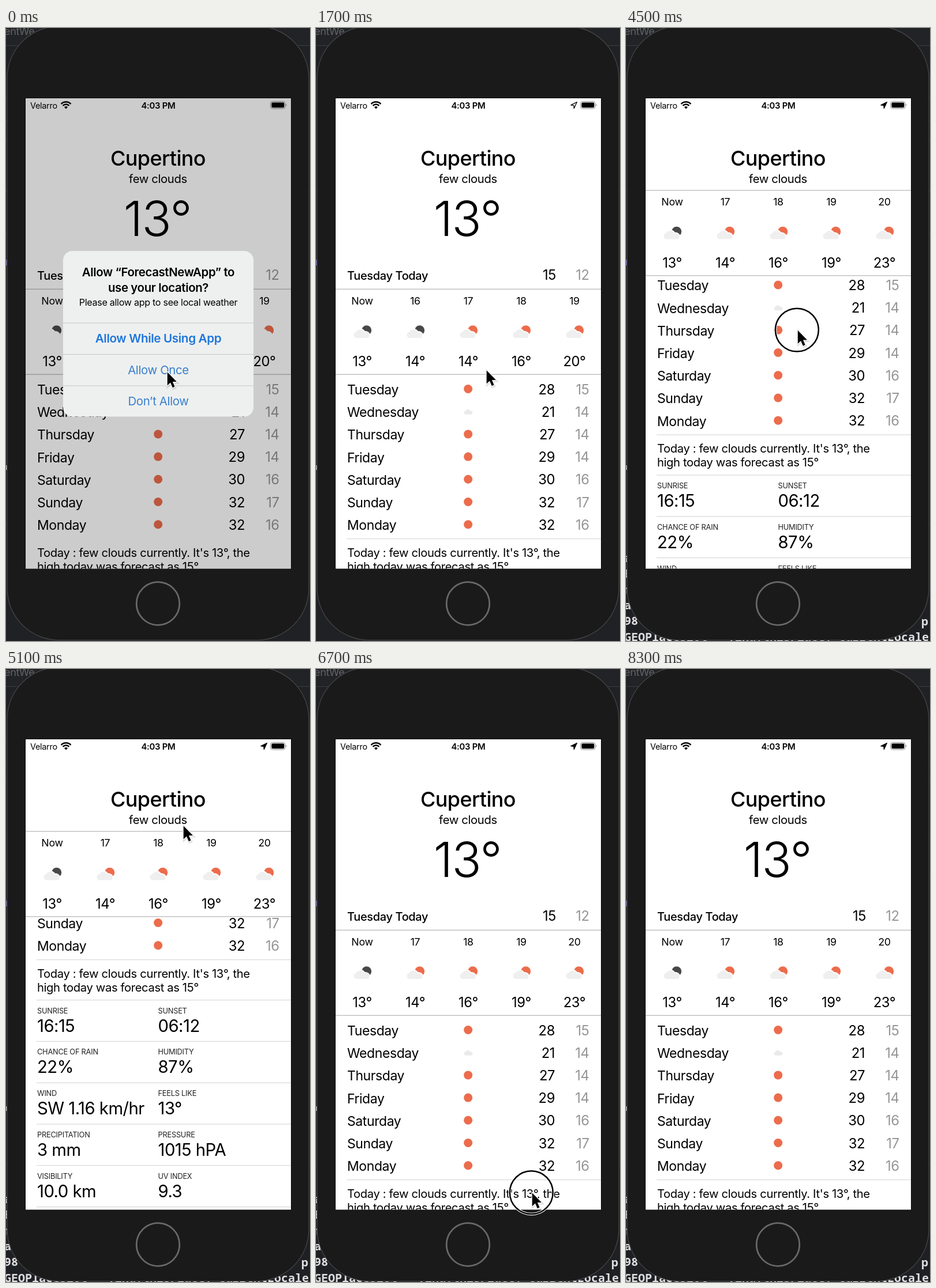
Write an HTML page that moves like this. It is 527 px wide and 1064 px high and loops after 8.4 s.

```html
<!DOCTYPE html>
<html lang="en">
<head>
<meta charset="utf-8">
<title>Weather</title>
<style>
html, body { margin: 0; width: 100%; height: 100%; overflow: hidden; background: #202125; }
svg { display: block; width: 527px; height: 1064px; }
text { font-family: Inter, Roboto, sans-serif; letter-spacing: -0.018em; white-space: pre; }
.mono { font: 700 20px "Noto Sans Mono", "DejaVu Sans Mono", monospace; letter-spacing: 0; fill: #dededf; }
</style>
</head>
<body>
<svg id="stage" viewBox="0 0 527 1064"></svg>
<script>
const LOOP = 8400, STEP = 100, MAX_SCROLL = 382, COLLAPSE = 171.5;
const SUN = '#ec6c4c', NIGHT = '#48484a', CLOUD = '#efefef', GREY = '#969696';

const rect = (x, y, w, h, fill, extra = '') =>
  `<rect x="${x}" y="${y}" width="${w}" height="${h}" fill="${fill}" ${extra}/>`;
const circle = (x, y, r, fill, extra = '') =>
  `<circle cx="${x}" cy="${y}" r="${r}" fill="${fill}" ${extra}/>`;
const text = (x, y, size, str, { anchor = 'start', weight = 400, fill = '#000' } = {}) =>
  `<text x="${x}" y="${y}" font-size="${size}" text-anchor="${anchor}" font-weight="${weight}" fill="${fill}">${str}</text>`;
const mid = { anchor: 'middle' }, end = { anchor: 'end' };
const pale = { anchor: 'end', fill: GREY };

// Desktop behind the phone
function desktop() {
  const edges = [120, 160, 195, 283, 355, 860].map(y => rect(0, y, 527, 1, '#37383b')).join('');
  const rows = ['a', 'B', 'm', 'a', '98', 'GEOPlaceSlot = find(thisPlace, currentLocale'];
  const log = rows.map((r, i) => `<text class="mono" x="-3" y="${927 + i * 27.3}">${r}</text>`).join('');
  return rect(0, 0, 527, 1064, '#202125') + rect(0, 0, 527, 30, '#222327') +
    rect(0, 30, 527, 1, '#3c3d41') + edges +
    text(-3, 12, 18, 'entWe', { fill: '#636467' }) +
    rect(0, 402, 1.5, 10, '#7d6bb5') + rect(0, 759, 1.5, 8, '#c9c9c9') +
    `<g id="log">${rect(0, 861, 527, 203, '#1f2024')}${log}<text class="mono" x="512" y="1037">p</text></g>`;
}

function phone() {
  return rect(2, -3, 523, 1065.5, '#1a1a1a', 'rx="90" stroke="#48484a" stroke-width="1.2"') +
    circle(263.5, 999, 37.3, 'none', 'stroke="#696969" stroke-width="2.8"') +
    rect(34, 122, 460, 816.5, '#fff', 'stroke="#0c0c0c" stroke-width="2" paint-order="stroke"');
}

function cloudIcon(x, color) {
  const shape = 'M-10 13A5.4 5.4 0 0 1 -10.2 2.4A8 8 0 0 1 4 3.4A5.9 5.9 0 0 1 10.5 13Z';
  return `<g transform="translate(${x} 525)">${circle(7.7, -0.2, 8.5, color)}
    <path d="${shape}" fill="#fff" stroke="#fff" stroke-width="3.6"/>
    <path class="faint" d="${shape}" fill="${CLOUD}"/></g>`;
}

function hours(id, names, temps, nights) {
  const cols = names.map((n, i) => {
    const x = 80 + 92 * i;
    return text(x, 479.5, 17.8, n, mid) + cloudIcon(x, i < nights ? NIGHT : SUN) +
      text(x, 587, 23.8, temps[i] + '°', mid);
  });
  return `<g id="${id}">${cols.join('')}</g>`;
}

function days() {
  const list = [['Tuesday', 28, 15], ['Wednesday', 21, 14], ['Thursday', 27, 14], ['Friday', 29, 14],
    ['Saturday', 30, 16], ['Sunday', 32, 17], ['Monday', 32, 16]];
  return list.map(([name, hi, lo], i) => {
    const y = 627 + 39.2 * i;
    const icon = i === 1
      ? `<path class="faint" d="M259 ${y + 4.5}a3.2 3.2 0 0 1 0-6.2a4.5 4.5 0 0 1 8.2 0a3.2 3.2 0 0 1 2 6.2z" fill="#eaeaea"/>`
      : circle(263.7, y - 0.5, 7.5, SUN);
    return text(54, y + 9, 23, name) + icon + text(414, y + 8.5, 23.8, hi, end) +
      text(473.5, y + 8.5, 23.8, lo, pale);
  }).join('');
}

const divider = y => rect(53, y, 441, 1.2, '#d9d9d9', 'class="faint"');

function details() {
  const rows = [['SUNRISE', '16:15', 'SUNSET', '06:12'], ['CHANCE OF RAIN', '22%', 'HUMIDITY', '87%'],
    ['WIND', 'SW 1.16 km/hr', 'FEELS LIKE', '13°'], ['PRECIPITATION', '3 mm', 'PRESSURE', '1015 hPA'],
    ['VISIBILITY', '10.0 km', 'UV INDEX', '9.3']];
  const cells = rows.map((r, i) => {
    const y = 956 + 71.8 * i;
    return divider(y) + [0, 2].map(k => {
      const x = k ? 263.5 : 54;
      return text(x, y + 23.5, 12.8, r[k], { fill: '#222' }) + text(x, y + 55.5, 29.3, r[k + 1]);
    }).join('');
  });
  return divider(886) + text(54, 917.5, 20.2, "Today : few clouds currently. It's 13°, the") +
    text(54, 942, 20.2, 'high today was forecast as 15°') + cells.join('') + divider(956 + 71.8 * 5);
}

function statusBar() {
  const arc = r => `<path d="M${104 - r * .74} ${140 - r * .7}A${r} ${r} 0 0 1 ${104 + r * .74} ${140 - r * .7}" fill="none" stroke="#000" stroke-width="2.5"/>`;
  return text(42, 139.5, 14.4, 'Velarro') + arc(11.4) + arc(7.3) +
    '<path d="M104 140.5L101 137.3Q104 134.8 107 137.3Z"/>' +
    text(264, 139.5, 14.9, '4:03 PM', { anchor: 'middle', weight: 600 }) +
    '<path id="arrow" d="M452.3 128.5L441.8 133.8L446.8 134.3L447.3 139.6Z" stroke="#000" stroke-width="1.3" stroke-linejoin="round"/>' +
    rect(458.5, 127.5, 25.5, 12.5, 'none', 'rx="3.8" stroke="#8c8c8c" stroke-width="1"') +
    rect(460.3, 129.3, 22, 9, '#000', 'rx="2.2"') +
    '<path d="M485.3 131.6q2.4 2.1 0 4.2z" fill="#8c8c8c"/>';
}

function alertBox() {
  const line = y => rect(99, y, 330, 1, '#c5c7c7');
  const bold = { anchor: 'middle', weight: 600 };
  const blue = { anchor: 'middle', fill: '#3a7fcd' };
  return rect(99, 387, 330, 287.5, '#eef0ef', 'rx="16"') +
    `<g id="pressed">${rect(99, 566, 330, 54, '#dcdedd')}</g>` +
    text(264, 430.5, 20.4, 'Allow “ForecastNewApp” to', bold) +
    text(264, 457.5, 20.4, 'use your location?', bold) +
    text(264, 482, 16.1, 'Please allow app to see local weather', mid) +
    line(511.5) + line(566) + line(620.5) +
    text(264, 546, 20.7, 'Allow While Using App', { ...bold, fill: '#1f76dc' }) +
    text(264, 600.5, 20.4, 'Allow Once', blue) + text(264, 655, 20.4, 'Don’t Allow', blue);
}

function pointer() {
  const d = 'M0.7 1.2V24.5L6 19.5L9.8 28.2L13.6 26.6L9.9 18.1H17Z';
  const ring = (color, width) => circle(-0.7, 0.7, 37.4, 'none', `stroke="${color}" stroke-width="${width}"`);
  return `<g id="touch">${ring('#fff', 4.6)}${ring('#000', 2.5)}</g>
    <path d="${d}" transform="translate(0.8 1.6)" fill="none" stroke="#000" stroke-opacity=".13" stroke-width="3.6"/>
    <path d="${d}" stroke="#fff" stroke-width="2.6" stroke-linejoin="round" paint-order="stroke"/>`;
}

const stage = document.getElementById('stage');
stage.innerHTML = `
  <clipPath id="screen">${rect(34, 122, 460, 816.5, '#000')}</clipPath>
  ${desktop()}${phone()}
  <g clip-path="url(#screen)">
    <g id="list">${days()}${details()}</g>
    <g id="strip">
      ${rect(34, 100, 460, 501, '#fff')}${rect(34, 452.7, 460, 1.2, '#b4b4b4')}${rect(34, 600.7, 460, 1.2, '#b4b4b4')}
      ${hours('before', ['Now', 16, 17, 18, 19], [13, 14, 14, 16, 20], 2)}
      ${hours('after', ['Now', 17, 18, 19, 20], [13, 14, 16, 19, 23], 1)}
      <g id="today">${text(54, 437, 20, 'Tuesday Today', { weight: 500 })}
      ${text(416, 437, 23.8, 15, end)}${text(473.5, 437, 23.8, 12, pale)}</g>
    </g>
    <g id="temp">${text(262.5, 361, 84.5, '13°', { anchor: 'middle', weight: 300 })}</g>
    ${text(263.5, 238.5, 36, 'Cupertino', { anchor: 'middle', weight: 500 })}
    ${text(263.5, 269, 20.3, 'few clouds', mid)}
    ${statusBar()}
    ${rect(34, 122, 460, 816.5, '#000', 'id="dim"')}
    <g id="alert">${alertBox()}</g>
  </g>
  <g id="pointer">${pointer()}</g>`;

const el = id => document.getElementById(id);
const faint = stage.querySelectorAll('.faint');
const clamp = (v, lo, hi) => Math.min(hi, Math.max(lo, v));
const show = (id, on) => el(id).setAttribute('visibility', on ? 'visible' : 'hidden');
const fade = (id, a) => el(id).setAttribute('opacity', a);
const move = (id, x, y) => el(id).setAttribute('transform', `translate(${x} ${y})`);
const within = (t, a, b) => t >= a && t < b;

// time, x, y of the pointer tip
const path = [[0, 279, 596], [900, 279, 596], [1700, 295, 593], [2300, 295, 593], [3800, 290, 704],
  [4100, 290, 704], [5000, 307, 271], [5200, 307, 271], [5500, 303, 492.5], [5800, 303, 492.5],
  [6100, 304, 498], [6700, 374, 908], [7500, 374, 908], [8000, 372, 1068], [LOOP, 372, 1068]];

function pointerAt(t) {
  const i = path.findIndex(k => k[0] > t);
  const [t0, x0, y0] = path[i - 1], [t1, x1, y1] = path[i];
  const u = (t - t0) / (t1 - t0), e = u * u * (3 - 2 * u);
  return [x0 + (x1 - x0) * e, y0 + (y1 - y0) * e];
}

function scrollAt(t, y) {
  if (t < 4100) return 0;
  if (t < 5000) return clamp(704 - y, 0, MAX_SCROLL);
  if (t < 5800) return MAX_SCROLL;
  if (t < 6700) return clamp(MAX_SCROLL - (y - 492.5), 0, MAX_SCROLL);
  return 0;
}

function draw(t) {
  const [x, y] = pointerAt(t), s = scrollAt(t, y);
  const alert = clamp((1300 - t) / 300, 0, 1);
  const header = clamp(1 - s / 100, 0, 1);
  move('list', 0, -s);
  move('strip', 0, -Math.min(s, COLLAPSE));
  fade('today', header);
  fade('temp', header);
  fade('dim', 0.2 * alert);
  fade('alert', alert);
  faint.forEach(f => f.setAttribute('opacity', 1 - alert));

  const updated = t >= 2400;
  show('before', !updated);
  show('after', updated);
  show('log', updated);
  show('arrow', t >= 1300);
  el('arrow').setAttribute('fill', updated ? '#000' : 'none');

  show('pressed', within(t, 800, 1000));
  show('touch', within(t, 800, 1000) || within(t, 4100, 5000) || within(t, 5800, 7000));
  show('pointer', t < 8000);
  move('pointer', x, y);
}

function tick() {
  draw(Math.floor((performance.now() % LOOP) / STEP) * STEP);
  requestAnimationFrame(tick);
}
tick();
</script>
</body>
</html>
```
